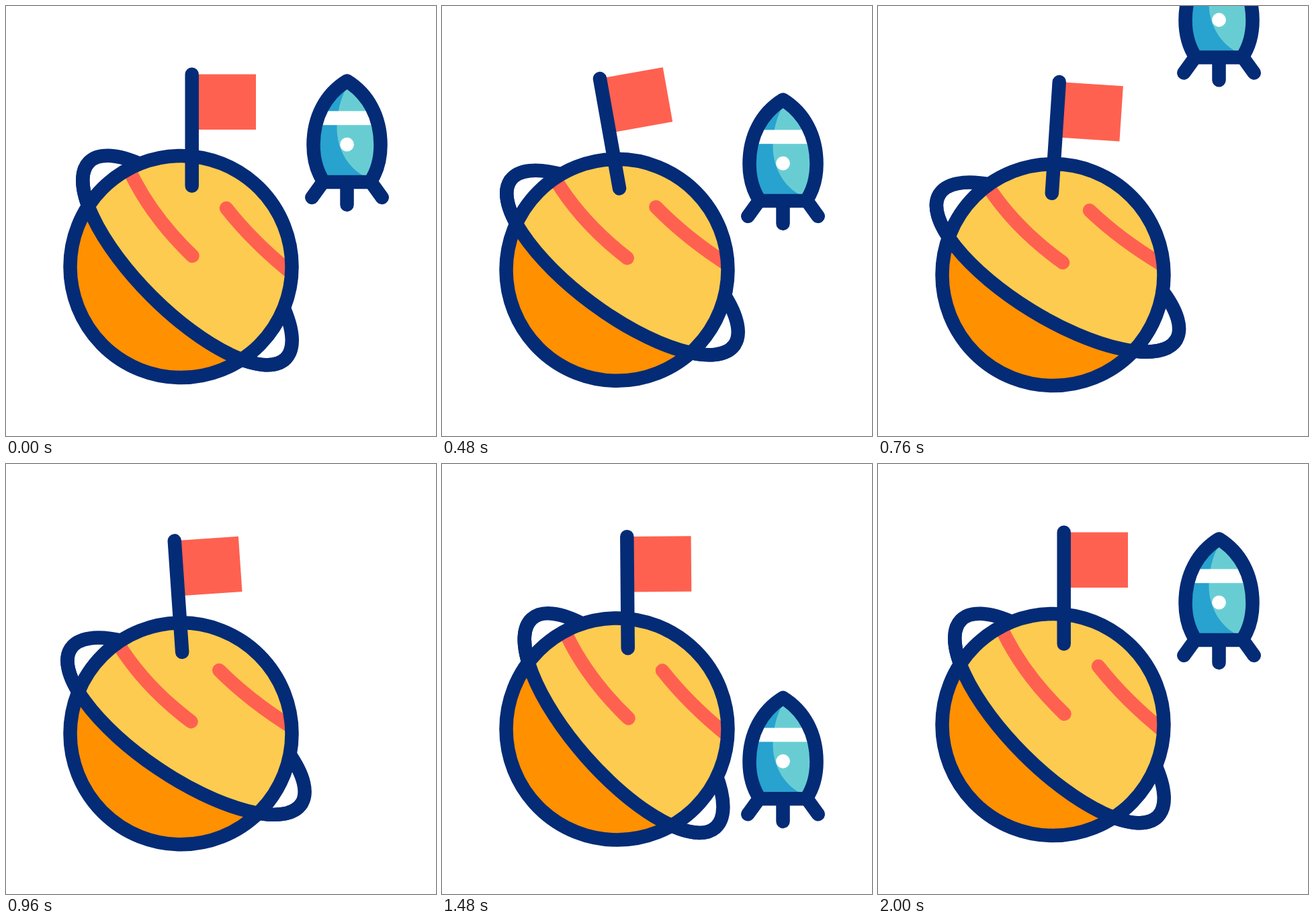
Write an HTML page that moves like this. It is 640 px wide and 640 px high and loops after 2040 ms.

```html
<!DOCTYPE html>
<html lang="en">
<head>
<meta charset="utf-8">
<title>Planet and rocket</title>
<style>
  html, body { margin: 0; width: 100%; height: 100%; overflow: hidden; background: #fff; }
  svg { display: block; width: 100%; height: 100%; }
  .line { fill: none; stroke: #042b76; stroke-width: 20.5; stroke-linecap: round; stroke-linejoin: round; }
  .stripe { fill: none; stroke: #ff6150; stroke-width: 20.5; stroke-linecap: round; }
</style>
</head>
<body>
<svg viewBox="0 0 640 640">
  <defs>
    <clipPath id="disc"><circle cx="260.5" cy="388" r="165"/></clipPath>
    <path id="hull" d="M507.5 111.6C476 131 457.5 165 457.5 207C457.5 229 463 247 473 262H542C552 247 557.5 229 557.5 207C557.5 165 539 131 507.5 111.6Z"/>
    <clipPath id="cabin"><use href="#hull"/></clipPath>
  </defs>

  <g id="planet">
    <g class="ring"><ellipse class="line" cy="-13.4" rx="206.9" ry="75.5"/></g>
    <circle cx="260.5" cy="388" r="165" fill="#fdcb50"/>
    <g clip-path="url(#disc)">
      <g class="spin">
        <path class="stripe" d="M183 243Q215 312 277.5 372"/>
        <path class="stripe" d="M328 301Q369 353 428 400"/>
      </g>
      <g class="ring">
        <path fill="#ff9000" d="M-206.9 -13.4A206.9 75.5 0 0 0 206.9 -13.4V200H-206.9Z"/>
      </g>
    </g>
    <circle class="line" cx="260.5" cy="388" r="165"/>
    <g class="ring"><path class="line" d="M-206.9 -13.4A206.9 75.5 0 0 0 206.9 -13.4"/></g>
    <g class="spin">
      <g id="flag">
        <rect x="280" y="101.6" width="92" height="82.4" fill="#ff6150"/>
        <path class="line" d="M276.7 101.7V267.7"/>
      </g>
    </g>
  </g>

  <g id="rocket">
    <g clip-path="url(#cabin)">
      <rect x="447" y="101" width="121" height="171" fill="#28a2cf"/>
      <path fill="#68cdd3" d="M509 118C497 138 492.5 160 492.5 182C492.5 212 508 240 534 254H568V118Z"/>
      <rect x="447" y="156.4" width="121" height="20.8" fill="#fff"/>
    </g>
    <circle cx="507.5" cy="206.2" r="10.4" fill="#fff"/>
    <use href="#hull" class="line"/>
    <path class="line" d="M470.5 264L455.3 285M544.5 264L559.7 285M507.5 264V295.7"/>
  </g>
</svg>
<script>
const LOOP = 2040, STEP = 40, CX = 260.5, CY = 388, OFFSTAGE = 1010;

// Ease in and out from 0 to 1 between two times.
function ease(t, from, to, power = 2) {
  const p = Math.min(1, Math.max(0, (t - from) / (to - from)));
  return p < 0.5 ? (2 * p) ** power / 2 : 1 - (2 - 2 * p) ** power / 2;
}

const bob = t => 13.4 * (ease(t, 0, 1070, 3) - ease(t, 1030, 1920, 3));

const spin = t => -8.2 * (ease(t, 0, 748) - ease(t, 763, 1438));

// The ring trails the planet, overshoots, then settles.
const tilt = t => -13.4 * ease(t, 137, 762, 3) + 17.4 * ease(t, 813, 1369) - 4 * ease(t, 1360, 2000);

// The flag lags behind, is blown over by the launch and swings back.
const sway = t => -4 * ease(t, 40, 440) + 16 * ease(t, 480, 740)
  - 14 * ease(t, 750, 1110) + 2 * ease(t, 1110, 1680);

// Crouch and launch off the top, then come back from below.
const lift = t => t < OFFSTAGE
  ? 28 * ease(t, 40, 480) - 430 * ease(t, 483, 1039)
  : 700 * (1 - ease(t, 763, 1980));

const place = (selector, transform) =>
  document.querySelectorAll(selector).forEach(el => el.setAttribute("transform", transform));

function draw(t) {
  place("#planet", `translate(0 ${bob(t)})`);
  place(".spin", `rotate(${spin(t)} ${CX} ${CY})`);
  place(".ring", `translate(${CX} ${CY}) rotate(${45 + tilt(t)})`);
  place("#flag", `rotate(${sway(t)} 276.7 265)`);
  place("#rocket", `translate(0 ${lift(t)})`);
}

const start = performance.now();
function tick() {
  const t = (performance.now() - start) % LOOP;
  const held = Math.floor(t / STEP) * STEP;
  draw(held > STEP ? held : 0);
  requestAnimationFrame(tick);
}
tick();
</script>
</body>
</html>
```
